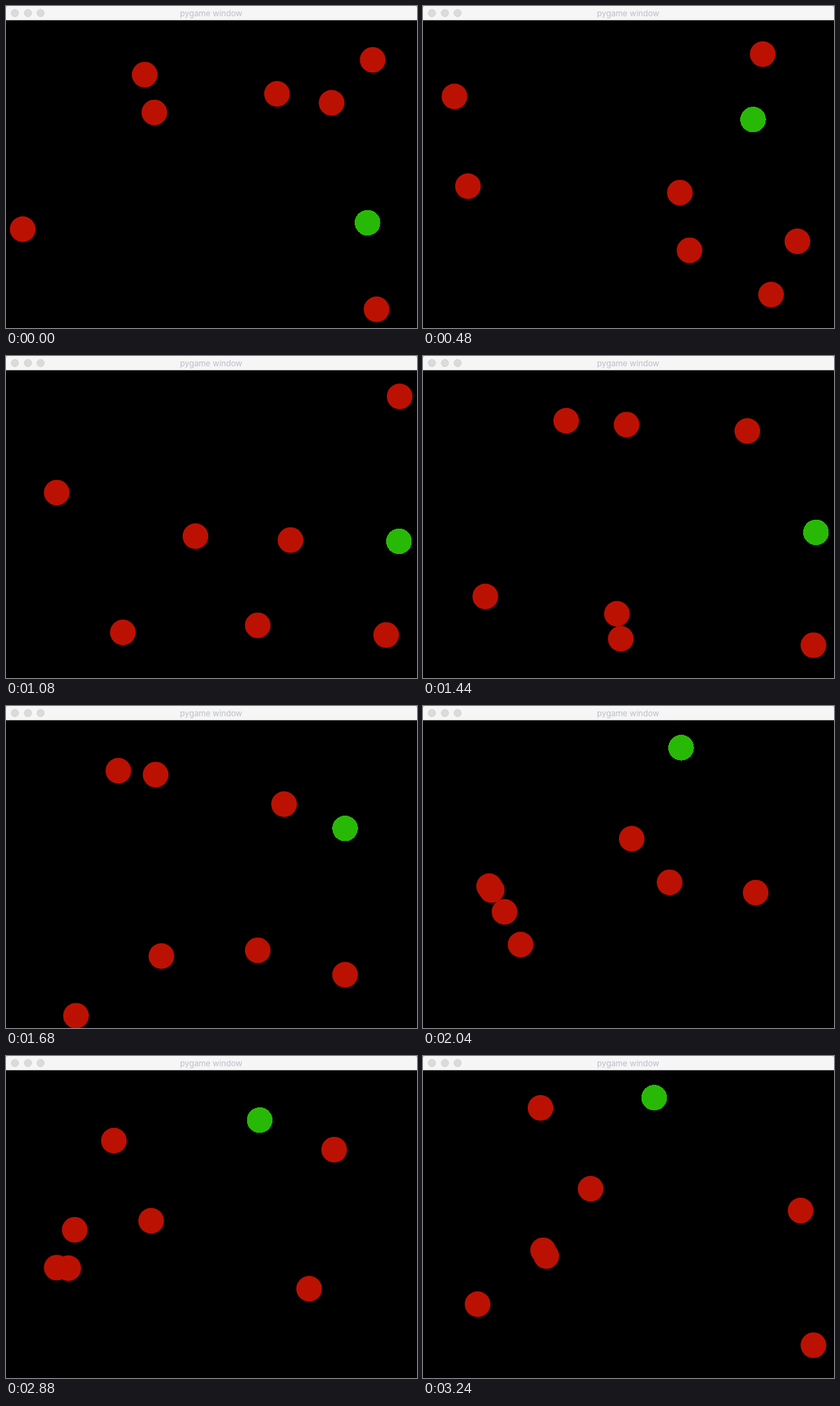
Animation, 600 px wide and 470 px high, one loop 3360 ms. Source, as an HTML page:

```html
<!DOCTYPE html>
<html lang="en">
<head>
<meta charset="utf-8">
<title>pygame window</title>
<style>
  html, body { margin: 0; width: 100%; height: 100%; overflow: hidden; background: #000; }
  svg { display: block; width: 600px; height: 470px; }
  text { font: 11.8px Inter, "Liberation Sans", sans-serif; fill: #b9bec9; text-anchor: middle; }
</style>
</head>
<body>
<svg viewBox="0 0 600 470">
  <rect width="600" height="470" fill="#000"/>
  <g id="balls" transform="translate(0 20.6) scale(.9375 .936)"></g>
  <rect width="600" height="20.6" fill="#c9c9c9"/>
  <path d="M0 20.6V4Q0 0 4 0H596Q600 0 600 4V20.6Z" fill="#f6f6f6"/>
  <g fill="#dbdbdb" stroke="#cbcbcb" stroke-width=".8">
    <circle cx="13" cy="10.3" r="5.3"/>
    <circle cx="32" cy="10.3" r="5.3"/>
    <circle cx="50.5" cy="10.3" r="5.3"/>
  </g>
  <text x="299.5" y="14.8">pygame window</text>
</svg>
<script>
const FRAME_MS = 120, FRAMES = 28;
const WIDTH = 640, HEIGHT = 480, RADIUS = 20, MARGIN = 25;
const SPEED = 7, HIT_DISTANCE = RADIUS + MARGIN;

// Arrow keys the player holds, each with its number of ticks
const KEYS = "U16 UL7 U7 D9 DR14 DL8 UR8 U2 UL30 L6 DL9 UR8 DR3 R9 DL1 L17 UR5 R2";
const heldKeys = KEYS.split(" ").flatMap(leg => {
  const [, keys, ticks] = leg.match(/(\D+)(\d+)/);
  return Array(+ticks).fill(keys);
});

const ball = (x, y, vx = 0, vy = 0) => ({ x, y, vx, vy });

const newGame = () => ({
  player: ball(563, 316),
  enemies: [
    ball(216, 85, 8, 8),
    ball(231, 144, -7, 5),
    ball(422, 115, 7, 10),
    ball(507, 129, -4, 10),
    ball(571, 62, 6, -3),
    ball(26, 326, 1, -9),
    ball(577, 451, 5, -1)
  ]
});

function bounce(position, velocity, size) {
  if (position <= MARGIN) return Math.abs(velocity);
  if (position >= size - MARGIN) return -Math.abs(velocity);
  return velocity;
}

function step({ player, enemies }, keys) {
  player.x += SPEED * (keys.includes("R") - keys.includes("L"));
  player.y += SPEED * (keys.includes("D") - keys.includes("U"));
  for (const enemy of enemies) {
    enemy.x += enemy.vx;
    enemy.y += enemy.vy;
    enemy.vx = bounce(enemy.x, enemy.vx, WIDTH);
    enemy.vy = bounce(enemy.y, enemy.vy, HEIGHT);
    if (Math.hypot(enemy.x - player.x, enemy.y - player.y) < HIT_DISTANCE) {
      enemy.vx = -enemy.vx;
      enemy.vy = -enemy.vy;
    }
  }
}

function addCircle(fill, rendering) {
  const circle = document.createElementNS("http://www.w3.org/2000/svg", "circle");
  circle.setAttribute("r", RADIUS);
  circle.setAttribute("fill", fill);
  circle.setAttribute("shape-rendering", rendering);
  return document.getElementById("balls").appendChild(circle);
}

function place(circle, { x, y }) {
  circle.setAttribute("cx", x);
  circle.setAttribute("cy", y);
}

const enemyCircles = newGame().enemies.map(() => addCircle("#bb1103", "auto"));
const playerCircle = addCircle("#28b906", "crispEdges");

// Just under six game ticks per picture, speeding up slightly
const ticksAt = frame => Math.floor(frame * (5.9 + 0.002425 * frame));

function draw(ms) {
  const frame = Math.floor(ms / FRAME_MS) % FRAMES;
  const game = newGame();
  heldKeys.slice(0, ticksAt(frame)).forEach(keys => step(game, keys));
  game.enemies.forEach((enemy, i) => place(enemyCircles[i], enemy));
  place(playerCircle, game.player);
}

const start = performance.now();
function loop() {
  draw(performance.now() - start);
  requestAnimationFrame(loop);
}
loop();
</script>
</body>
</html>
```
